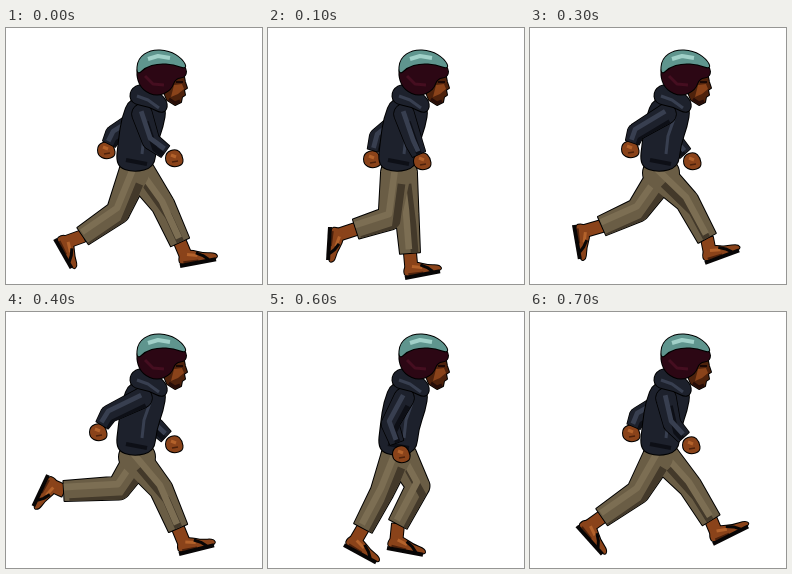
These frames come from a looping animation (256 px wide and 256 px high, 800 ms). An HTML page with a canvas:

```html
<!DOCTYPE html>
<html lang="en">
<head>
<meta charset="utf-8">
<style>
html, body { margin: 0; height: 100%; overflow: hidden; background: #fff; }
canvas { display: block; }
</style>
</head>
<body>
<canvas id="stage" width="256" height="256"></canvas>
<script>
const ctx = document.getElementById('stage').getContext('2d');
const STEP = 100;
const CLOTH = { base: '#6a5d45', light: '#7c6e53', dark: '#43392a' };
const COAT = { base: '#1d212c', light: '#383f50', dark: '#0d0f16' };
const SKIN = { base: '#8a431a', light: '#b3622b', dark: '#4e220c' };

// leg: knee, ankle, heel, toe. arm: elbow, hand.
const poses = [
  { near: [112,184, 77,208, 49,211, 66,241], far: [157,177, 174,214, 174,238, 211,231],
    nearArm: [145,113, 168,130], farArm: [108,106, 100,122] },
  { near: [122,190, 88,201, 62,199, 60,233], far: [139,186, 142,225, 137,250, 173,243],
    nearArm: [146,115, 154,133], farArm: [110,109, 104,131] },
  { near: [151,166, 122,206, 109,213, 126,243], far: [117,174, 84,211, 60,230, 89,252],
    nearArm: [121,106, 124,130], farArm: [124,106, 125,128] },
  { near: [157,173, 177,210, 175,235, 210,222], far: [108,182, 72,198, 44,197, 50,232],
    nearArm: [106,104, 100,121], farArm: [144,113, 162,133] },
  { near: [155,177, 172,216, 173,242, 209,233], far: [113,176, 58,179, 42,163, 27,195],
    nearArm: [103,102, 92,120], farArm: [147,112, 168,132] },
  { near: [137,186, 141,227, 138,251, 173,245], far: [122,192, 87,198, 69,187, 56,220],
    nearArm: [109,108, 104,132], farArm: [146,115, 153,134] },
  { near: [114,180, 95,216, 76,233, 109,251], far: [150,174, 130,212, 119,236, 156,243],
    nearArm: [122,112, 133,142], farArm: [126,112, 133,140] },
  { near: [108,180, 72,205, 47,214, 73,243], far: [160,174, 181,208, 183,232, 219,214],
    nearArm: [142,112, 161,133], farArm: [108,104, 101,121] }
];

function smooth(...p) {
  const path = new Path2D(), n = p.length;
  const mid = i => [(p[i % n][0] + p[(i + 1) % n][0]) / 2, (p[i % n][1] + p[(i + 1) % n][1]) / 2];
  path.moveTo(...mid(0));
  for (let i = 1; i <= n; i++) path.quadraticCurveTo(...p[i % n], ...mid(i));
  path.closePath();
  return path;
}

function poly(...p) {
  const path = new Path2D();
  p.forEach(q => path.lineTo(...q));
  path.closePath();
  return path;
}

function taper(path, [x, y], r, [X, Y], R) {
  const len = Math.hypot(X - x, Y - y) || 1;
  const nx = (y - Y) / len, ny = (X - x) / len;
  path.moveTo(x + nx * r, y + ny * r);
  path.lineTo(x - nx * r, y - ny * r);
  path.lineTo(X - nx * R, Y - ny * R);
  path.lineTo(X + nx * R, Y + ny * R);
  path.closePath();
}

// Two tapered sections with round joints and a flat end.
function limb(a, b, c, ra, rb, rc) {
  const path = new Path2D();
  for (const [p, r] of [[a, ra], [b, rb]]) {
    path.moveTo(p[0] + r, p[1]);
    path.arc(...p, r, 0, 7);
  }
  taper(path, a, ra, b, rb);
  taper(path, b, rb, c, rc);
  return path;
}

function outline(path, width = 2) {
  ctx.strokeStyle = '#000';
  ctx.lineWidth = width;
  ctx.stroke(path);
}

function fill(path, color) {
  ctx.fillStyle = color;
  ctx.fill(path);
}

function line(color, width, ...p) {
  ctx.strokeStyle = color;
  ctx.lineWidth = width;
  ctx.beginPath();
  p.forEach(q => ctx.lineTo(...q));
  ctx.stroke();
}

const shift = (p, dx, dy) => [p[0] + dx, p[1] + dy];
const mix = (a, b, t) => [a[0] + (b[0] - a[0]) * t, a[1] + (b[1] - a[1]) * t];

function shade(path, tone, joints, r) {
  fill(path, tone.base);
  ctx.save();
  ctx.clip(path);
  line(tone.dark, r * 0.7, ...joints.map(p => shift(p, r * 0.5, r)));
  line(tone.light, r * 0.6, ...joints.map(p => shift(p, -r * 0.1, -r * 0.35)));
  ctx.restore();
}

function foot(ankle, heel, toe) {
  const len = Math.hypot(toe[0] - heel[0], toe[1] - heel[1]);
  const u = [(toe[0] - heel[0]) / len, (toe[1] - heel[1]) / len];
  const at = (along, up) => [heel[0] + u[0] * along + u[1] * up, heel[1] + u[1] * along - u[0] * up];
  const shin = new Path2D();
  taper(shin, ankle, 6, at(8, 7), 6);
  const body = smooth(at(1, 0), at(0, 8), at(6, 14), at(15, 13), at(25, 8), at(len, 6), at(len + 1, 0));
  outline(shin);
  outline(body);
  fill(shin, SKIN.base);
  fill(body, SKIN.base);
  line(SKIN.light, 3, at(9, 10), at(19, 7));
  line(SKIN.dark, 2, at(4, 3), at(19, 2));
  line('#080606', 4, at(0, 0), at(len - 1, 0));
  line('#080606', 3, at(len * 0.48, 10), at(len * 0.65, 6), at(len * 0.78, 1));
}

function legs(pose) {
  const parts = [['far', [134, 145]], ['near', [128, 145]]].map(([key, hip]) => {
    const v = pose[key];
    const joints = [hip, v.slice(0, 2), v.slice(2, 4)];
    foot(joints[2], v.slice(4, 6), v.slice(6));
    return { joints, path: limb(...joints, 15, 11.5, 10) };
  });
  parts.forEach(p => outline(p.path));
  parts.forEach(p => shade(p.path, CLOTH, p.joints, 11));
}

function arm(shoulder, v) {
  const elbow = v.slice(0, 2), hand = v.slice(2);
  const cuff = mix(elbow, hand, 0.62);
  const sleeve = limb(shoulder, elbow, cuff, 10, 8.5, 7);
  const [x, y] = hand;
  const fist = smooth([x - 8, y - 5], [x + 2, y - 9], [x + 8, y - 3], [x + 9, y + 6], [x, y + 9], [x - 8, y + 5]);
  outline(fist);
  fill(fist, SKIN.base);
  line(SKIN.light, 3, [x - 3, y - 3], [x + 2, y - 1]);
  line(SKIN.dark, 1.5, [x - 2, y + 4], [x + 4, y + 3]);
  outline(sleeve, 1.5);
  shade(sleeve, COAT, [shoulder, elbow, cuff], 8);
}

function torso() {
  const coat = smooth([124, 70], [116, 90], [113, 112], [110, 138], [128, 144], [148, 139],
    [150, 118], [157, 98], [160, 80], [150, 66]);
  outline(coat);
  fill(coat, COAT.base);
  line(COAT.light, 3, [145, 88], [138, 108], [136, 126]);
  line(COAT.dark, 4, [120, 132], [141, 136]);
}

function head() {
  const hood = smooth([124, 62], [125, 75], [142, 78], [158, 86], [162, 76], [155, 66], [136, 55]);
  outline(hood);
  fill(hood, COAT.base);
  line(COAT.light, 3, [131, 68], [142, 72], [153, 80]);

  const face = poly([158, 44], [177, 44], [179, 54], [181, 60], [178, 62], [179, 67], [176, 69],
    [175, 74], [169, 77], [161, 72], [157, 62]);
  outline(face);
  fill(face, SKIN.dark);
  fill(poly([168, 57], [176, 56], [178, 61], [172, 66], [165, 69]), SKIN.base);
  line('#1a0805', 2, [170, 54], [177, 54]);
  line('#260d08', 3, [163, 71], [169, 75], [174, 73]);

  const hair = smooth([132, 36], [131, 50], [137, 62], [151, 68], [165, 62], [169, 50], [180, 49],
    [180, 38], [160, 28]);
  outline(hair);
  fill(hair, '#2c0714');
  line('#450e20', 3, [139, 48], [147, 56], [158, 57]);

  const cap = smooth([131, 47], [132, 31], [145, 22], [163, 23], [176, 31], [181, 41], [168, 36],
    [152, 35], [139, 39]);
  outline(cap);
  fill(cap, '#5f958e');
  line('#a0d0c8', 4, [142, 31], [152, 28], [164, 30]);
}

function draw(pose) {
  ctx.fillStyle = '#fff';
  ctx.fillRect(0, 0, 256, 256);
  ctx.lineJoin = 'round';
  legs(pose);
  arm([137, 88], pose.farArm);
  torso();
  arm([136, 86], pose.nearArm);
  head();
}

function tick(now) {
  draw(poses[Math.floor(now / STEP) % poses.length]);
  requestAnimationFrame(tick);
}
tick(performance.now());
</script>
</body>
</html>
```
